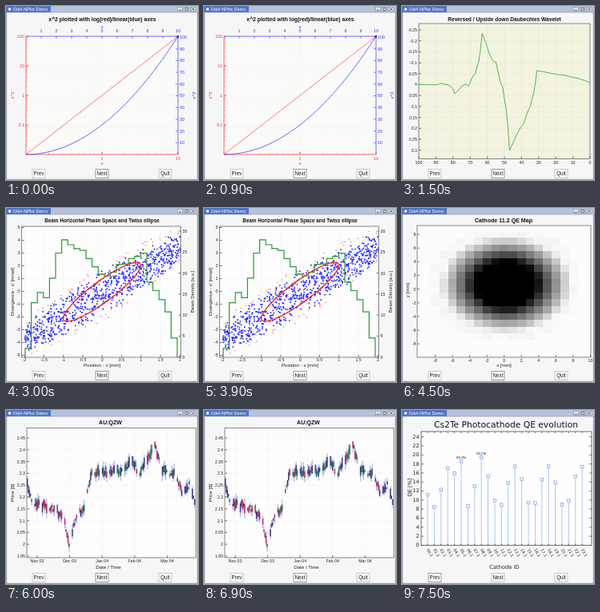
These frames come from a looping animation (240 by 218 pixels, 8000 ms). An HTML page:

```html
<!DOCTYPE html>
<html lang="en">
<head>
<meta charset="utf-8">
<title>Plot demo</title>
<style>
html, body { margin: 0; width: 100%; height: 100%; overflow: hidden; background: #f5f5f5; }
svg { display: block; width: 100vw; height: 100vh; font-family: "Liberation Sans", Arial, sans-serif; }
.wide { font-family: "DejaVu Sans", Verdana, sans-serif; }
</style>
</head>
<body>
<svg id="stage" viewBox="0 0 240 218" preserveAspectRatio="none"></svg>
<script>
const HOLD = 1500, LOOP = 8000;
const RED = '#f33', BLUE = '#33f', INK = '#222', GRID = '#dcdcdc';

const rect = (x, y, w, h, fill, stroke = 'none', sw = 0.7) =>
  `<rect x="${x}" y="${y}" width="${w}" height="${h}" fill="${fill}" stroke="${stroke}" stroke-width="${sw}"/>`;
const path = (d, stroke, sw = 0.8, extra = '') =>
  `<path d="${d}" fill="none" stroke="${stroke}" stroke-width="${sw}" ${extra}/>`;
const line = (x1, y1, x2, y2, stroke, sw, extra) => path(`M${x1} ${y1}L${x2} ${y2}`, stroke, sw, extra);
const dotted = (x1, y1, x2, y2, stroke) => line(x1, y1, x2, y2, stroke, 0.5, 'stroke-dasharray="1 1.5"');
const text = (s, x, y, size, fill = INK, anchor = 'middle', extra = '') =>
  `<text x="${x}" y="${y}" font-size="${size}" fill="${fill}" text-anchor="${anchor}" ${extra}>${s}</text>`;
const upright = (s, x, y, size, fill) =>
  text(s, x, y, size, fill, 'middle', `transform="rotate(-90 ${x} ${y})"`);
const heading = (s, x, y = 18.5, size = 6.8) => text(s, x, y, size, '#111', 'middle', 'font-weight="bold"');
const poly = pts => 'M' + pts.map(p => p.map(v => v.toFixed(1)).join(' ')).join('L');
const range = (n, f) => Array.from({ length: n }, (_, i) => f(i));
const num = (v, d) => String(+v.toFixed(d));
const clamp = (v, lo, hi) => Math.min(hi, Math.max(lo, v));

function seeded(seed) {
  return () => {
    seed = (seed * 16807) % 2147483647;
    return seed / 2147483647;
  };
}

// Straight interpolation through a few key points.
function through(pts, x) {
  const i = clamp(pts.findIndex(p => p[0] > x), 1, pts.length - 1);
  const [ax, ay] = pts[i - 1], [bx, by] = pts[i];
  return ay + (by - ay) * clamp((x - ax) / (bx - ax), 0, 1);
}

// Evenly spaced tick labels along a horizontal or vertical edge.
function xTicks(labels, x0, step, y, { edge, dir = -1, color = INK, size = 5.3, grid, top }) {
  return labels.map((s, i) => {
    const x = x0 + i * step;
    return (grid ? dotted(x, top, x, edge, grid) : '') +
      line(x, edge, x, edge + dir * 3, color, 0.6) + text(s, x, y, size, color);
  }).join('');
}
function yTicks(labels, y0, step, x, { edge, dir = 1, color = INK, size = 5.3, anchor = 'end', grid, far }) {
  return labels.map((s, i) => {
    const y = y0 + i * step;
    return (grid ? dotted(edge, y, far, y, grid) : '') +
      line(edge, y, edge + dir * 3, y, color, 0.6) + text(s, x, y + 1.9, size, color, anchor);
  }).join('');
}

function logLinear() {
  const L = 25, R = 215, T = 38, B = 186;
  let s = heading('x^2 plotted with log(red)/linear(blue) axes', 120.5) + rect(L, T, R - L, B - T, '#fbfbf9');
  for (let d = 0; d < 4; d++) {
    for (let k = 1; k < 10; k++) {
      const m = d + Math.log10(k), y = B - 37 * m, x = L + 95 * m;
      const shade = k === 1 ? '#d8d8d8' : '#eee', len = k === 1 ? 3 : 1.5;
      s += dotted(L, y, R, y, shade) + line(L, y, L + len, y, RED, 0.5);
      if (d < 2) s += dotted(x, T, x, B, shade) + line(x, B, x, B - len, RED, 0.5);
    }
  }
  s += yTicks(['100', '10', '1', '0.1'], T, 37, 23, { edge: L, color: RED });
  s += xTicks(['1', '10'], 120, 95, 192.5, { edge: B, color: RED });
  s += xTicks(range(10, i => i + 1), 44, 19, 33, { edge: T, dir: 1, color: BLUE });
  s += yTicks(range(10, i => 100 - 10 * i), T + 1, 14.7, 217, { edge: R, dir: -1, color: BLUE, anchor: 'start' });
  s += text('x', 120, 28, 6, BLUE) + text('x', 120, 199, 6, RED) +
    upright('x^2', 9.5, 112, 6, RED) + upright('x^2', 237, 112, 6, BLUE);
  s += path(`M${L} ${T}V${B}H${R}`, RED, 0.7) + path(`M${L} ${T}H${R}V${B}`, BLUE, 0.7);
  s += line(L, B, R, T, '#ff5a5a', 0.8);
  s += path(poly(range(51, i => [L + i * 3.8, B - (B - T) * (i / 50) ** 2])), '#5555ff', 0.9);
  return s + rect(R - 1.2, T - 1, 2.2, 2.2, '#224');
}

// Daubechies-4 wavelet by repeated inverse transform of a unit coefficient.
function daubechies(len) {
  const r = Math.sqrt(3), h = [1 + r, 3 + r, 3 - r, 1 - r].map(v => v / (4 * Math.SQRT2));
  const g = [h[3], -h[2], h[1], -h[0]];
  let a = new Array(len).fill(0);
  a[8] = 1;
  for (let n = 8; n < len; n *= 2) {
    const next = a.map((v, i) => i < 2 * n ? 0 : v);
    for (let i = 0; i < n; i++) {
      for (let j = 0; j < 4; j++) next[(2 * i + j) % (2 * n)] += h[j] * a[i] + g[j] * a[i + n];
    }
    a = next;
  }
  return a;
}

function wavelet() {
  const wave = daubechies(256).slice(0, 101);
  return heading('Reversed / Upside down Daubechies Wavelet', 128, 18.5, 6.6) +
    rect(21, 22, 214, 169.5, '#f3f3df') +
    yTicks(range(12, i => num(-0.25 + 0.05 * i, 2)), 30, 13.7, 19, { edge: 21, grid: '#cfcfbd', far: 235 }) +
    xTicks(range(11, i => 100 - 10 * i), 21, 21.4, 198, { edge: 191.5, grid: '#cfcfbd', top: 22 }) +
    rect(21, 22, 214, 169.5, 'none', '#555') +
    path(poly(wave.map((v, i) => [235 - 2.14 * i, 98.5 + 274 * v])), '#41ad41', 0.9);
}

function phaseSpace() {
  const rnd = seeded(71), L = 19.5, R = 218.5, T = 23, B = 187;
  let s = heading('Beam Horizontal Phase Space and Twiss ellipse', 120, 18, 6.3) + rect(L, T, R - L, B - T, '#fdfdfd');
  s += yTicks(range(11, i => 5 - i), 24.5, 16, 17.5, { edge: L, grid: GRID, far: R });
  s += xTicks(range(9, i => num(-2 + i / 2, 1)), 23, 24.3, 192, { edge: B, grid: GRID, top: T });
  s += yTicks(range(7, i => 30 - 5 * i), 29, 26.3, 220.5, { edge: R, dir: -1, anchor: 'start' });

  let blue = '', red = '';
  for (let i = 0; i < 850; i++) {
    const u = 2 * rnd() - 1, off = rnd() + rnd() - 1;
    const x = 120 + 97 * u, y = 106 - 58 * u + off * (17 + 21 * Math.sqrt(1 - u * u));
    const dot = `M${x.toFixed(1)} ${y.toFixed(1)}`;
    if (Math.abs(off) > 0.72) red += dot + 'h1.2';
    else blue += dot + 'h1.7';
  }
  s += path(red, '#ff5050', 1.2) + path(blue, '#2b2bff', 1.7);

  const density = [[28, 172], [37, 104], [50, 114], [62, 70], [74, 36], [84, 52], [105, 60], [122, 86],
    [160, 64], [172, 53], [180, 92], [206, 134], [214, 184]];
  const w = 7.6;
  const steps = range(25, i => {
    const y = through(density, 27.8 + w * i) + (rnd() - 0.5) * 8;
    return `V${Math.min(B, y).toFixed(1)}H${(24 + w * (i + 1)).toFixed(1)}`;
  });
  s += path(`M24 ${B}${steps.join('')}V${B}`, '#2c9838', 1.2);
  s += path(poly(range(61, i => {
    const a = i * Math.PI / 30;
    return [120 + 48.5 * Math.cos(a), 105 - 37 * Math.sin(a + 1.12)];
  })), '#f02020', 1.3);
  return s + rect(L, T, R - L, B - T, 'none', '#555') + text('Position - x [mm]', 120, 199, 6.2) +
    upright("Divergence - x' [mrad]", 10, 105, 6.2) + upright('Beam Density [a.u.]', 235, 105, 6);
}

function heatMap() {
  const rnd = seeded(19), L = 19, T = 22, W = 217, H = 165, cw = 10.78, ch = 8.58;
  let s = heading('Cathode 11.2 QE Map', 127, 17.8, 7.1) + rect(L, T, W, H, '#fcfcfc');
  let cells = '';
  for (let my = -8; my <= 8; my++) {
    for (let mx = -8; mx <= 8; mx++) {
      const x = 127.7 + mx * cw, y = 101.4 - my * ch;
      const d = Math.hypot((x - 130) / 39, (y - 95.5) / 29);
      const k = clamp((d - 1) / 1.1, 0, 1);
      const v = Math.round(k ** 0.85 * 250 - (k > 0.1 ? rnd() * 6 : 0));
      if (d < 2.5) cells += rect((x - cw / 2).toFixed(1), (y - ch / 2).toFixed(1), cw + 0.1, ch + 0.1, `rgb(${v},${v},${v})`);
    }
  }
  s += `<g shape-rendering="crispEdges">${cells}</g>`;
  s += yTicks(range(9, i => 8 - 2 * i), 33, 17.15, 17.5, { edge: L });
  s += xTicks(range(10, i => -8 + 2 * i), 41.5, 21.55, 192.5, { edge: T + H });
  return s + rect(L, T, W, H, 'none', '#555') + text('x [mm]', 127.5, 199, 6.2) + upright('y [mm]', 8.5, 103, 6.2);
}

function candles() {
  const rnd = seeded(523), L = 26, R = 237.5, T = 22.5, B = 185;
  const trend = [[26, 92], [33, 118], [58, 122], [72, 134], [79, 168], [88, 133], [97, 124], [107, 79], [146, 76],
    [158, 64], [167, 80], [186, 42], [194, 74], [212, 82], [222, 106], [230, 92], [238, 125]];
  let s = heading('AU:QZW', 130.5, 18.3, 7) + rect(L, T, R - L, B - T, '#fdfdfd');
  s += yTicks(range(11, i => num(2.45 - 0.05 * i, 2)), 35, 14.8, 24, { edge: L, grid: GRID, far: R });
  s += xTicks(['Nov 03', 'Dec 03', 'Jan 04', 'Feb 04', 'Mar 04'], 39, 40.6, 191, { edge: B, grid: GRID, top: T });
  for (let day = 0; day < 157; day++) {
    if (day % 7 > 4) continue;
    const x = L + 0.7 + day * 1.34, y = through(trend, x) + (rnd() - 0.5) * 7;
    const h = 2 + rnd() * 11, up = rnd() * 7, down = rnd() * 7, pick = rnd();
    const body = pick < 0.3 ? '#c02448' : pick < 0.55 ? '#1c7848' : '#34367c';
    s += line(x, y - h / 2 - up, x, y + h / 2 + down, '#6a70d4', 0.6) +
      rect((x - 0.7).toFixed(2), (y - h / 2).toFixed(2), 1.4, h.toFixed(2), body);
  }
  return s + rect(L, T, R - L, B - T, 'none', '#555') + text('Date / Time', 128, 199, 6.2) + upright('Price [$]', 10, 104, 6.2);
}

function stems() {
  const L = 24, R = 237, T = 27, B = 169.5, unit = 5.66;
  let s = text('Cs2Te Photocathode QE evolution', 130, 22.3, 10.7, '#111') + rect(L, T, R - L, B - T, '#fefefe');
  s += yTicks(range(13, i => 24 - 2 * i), B - 24 * unit, 2 * unit, 21.5, { edge: L, size: 6.4 });
  s += yTicks(range(13, () => ''), B - 24 * unit, 2 * unit, R, { edge: R, dir: -1 });
  for (let i = 0; i < 24; i++) {
    const coated = i === 5 || i === 8;
    const qe = coated ? 17.1 + 0.3 * i : 13 - 4.5 * Math.cos(2 * Math.PI * (i - 0.9) / 4.87);
    const x = 32 + i * 8.4, y = B - qe * unit, name = String(i).padStart(2, '0') + '.1';
    s += line(x, B, x, y, '#a8c6f5', 1) + rect(x - 1.8, y - 1.8, 3.6, 3.6, '#f4f8ff', '#86aaf0', 0.8) +
      line(x, B, x, B - 2, INK, 0.6) + line(x, T, x, T + 2, INK, 0.6) +
      text(name, x - 1.5, 175, 4.9, INK, 'start', `transform="rotate(60 ${x - 1.5} 175)"`);
    if (coated) s += text('KCsTe', x, y - 3, 4.2);
  }
  s += rect(L, T, R - L, B - T, 'none', '#333');
  return `<g class="wide">${s}${text('Cathode ID', 128, 198.5, 6.7)}${upright('QE [%]', 11.5, 97, 6.7)}</g>`;
}

function windowFrame() {
  let s = rect(0, 0, 240, 218, '#f6f6f6') + rect(0, 0, 240, 8, '#b4c2dc') + rect(0, 0, 56, 8, '#4f74c4') +
    line(0, 8, 240, 8, '#8492ac', 0.6);
  s += rect(2.5, 2, 4, 4, '#e8eefa', '#2c4c84', 0.5) + text('Gtk#-NPlot Demo', 8.5, 6.3, 5.6, '#fff', 'start');
  s += range(3, i => rect(214.5 + 8.3 * i, 1.4, 6, 5.4, '#dfe3ea', '#7b8494', 0.5)).join('');
  s += line(216, 5.3, 219, 5.3, '#444', 0.8) + rect(224.2, 2.7, 3, 2.8, 'none', '#444', 0.7) +
    path('M232.6 2.6l3 3m0 -3l-3 3', '#444', 0.8);
  return s + path('M0.6 8V217.4H239.4V8', '#8d949e', 1);
}

function buttons(focus) {
  return ['Prev', 'Next', 'Quit'].map((s, i) => {
    const x = 33 + i * 79;
    return rect(x, 204.5, 16, 11, '#f8f8f8', i === focus ? '#777' : '#b8b8b8', 0.7) + text(s, x + 8, 212.4, 6.3);
  }).join('');
}

const plots = [logLinear, wavelet, phaseSpace, heatMap, candles, stems];
const stage = document.getElementById('stage');
stage.innerHTML = windowFrame() +
  plots.map((draw, i) => `<g class="page">${draw()}${buttons(i === 5 ? 0 : 1)}</g>`).join('');
const pages = [...stage.querySelectorAll('.page')];

function show(t) {
  const current = Math.floor((t % LOOP) / HOLD);
  pages.forEach((p, i) => p.setAttribute('display', i === current ? 'inline' : 'none'));
}

const start = performance.now();
function tick() {
  show(performance.now() - start);
  requestAnimationFrame(tick);
}
tick();
</script>
</body>
</html>
```
